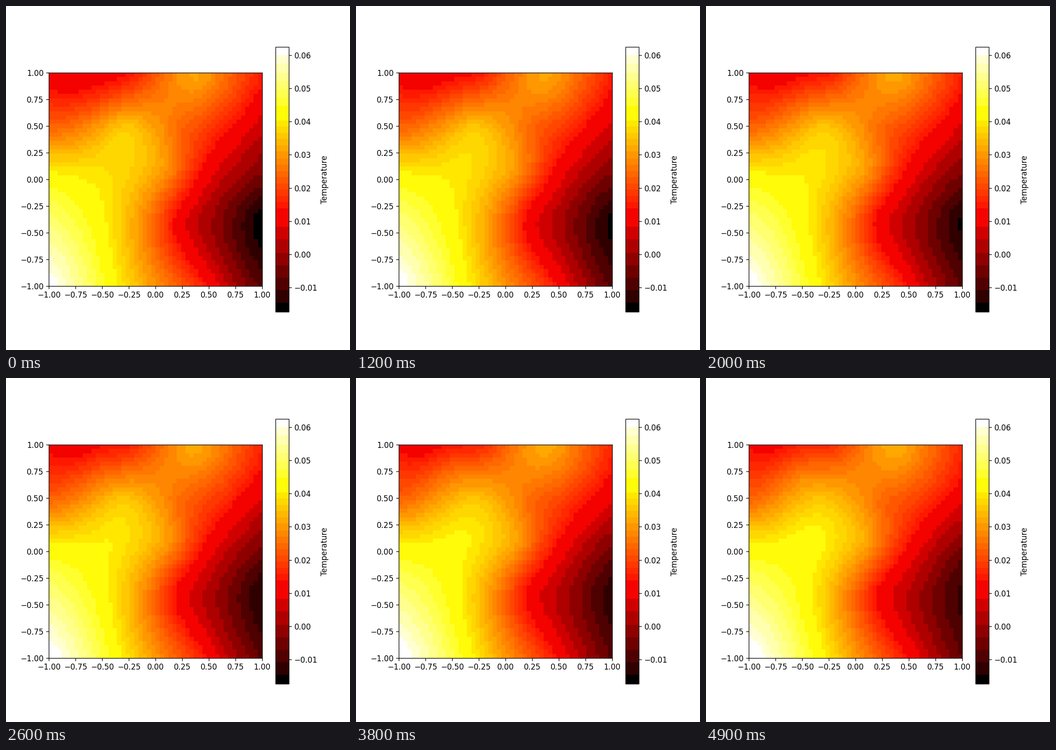
A matplotlib script for the animation above (5 s loop, 748x748 px).

```python
import numpy as np
import matplotlib.pyplot as plt
from matplotlib.animation import FuncAnimation
from matplotlib.colors import ListedColormap

SIZE, DPI = 748, 120
LAYOUT = 747.6          # side in pixels that the axes are laid out on
FRAMES, INTERVAL = 50, 100
CELLS = 50
VMIN, VMAX = -0.01724, 0.06243

# Sensors: x, y, starting heat and its rise over a loop, in percent of the range.
SENSORS = np.array([
    (-0.80, 1.00, 32.5, 4.0), (-0.25, 1.00, 39.0, 3.5),
    (0.37, 1.00, 61.0, 1.5), (1.00, 1.00, 40.3, 1.7),
    (-0.50, 0.75, 46.0, 8.0), (-1.00, 0.50, 51.0, 0.0),
    (-0.30, 0.47, 67.0, -0.5), (0.25, 0.45, 51.0, 1.0),
    (1.00, 0.50, 29.0, 5.0), (-0.40, 0.15, 69.5, 4.5),
    (0.10, 0.10, 58.5, 3.0), (0.55, 0.10, 33.5, 4.0),
    (-1.00, 0.00, 75.5, 0.0), (1.00, 0.00, 15.0, 0.0),
    (-0.50, -0.40, 73.5, 2.3), (0.00, -0.40, 51.0, 0.5),
    (0.25, -0.40, 34.0, 2.0), (1.00, -0.39, 0.0, 6.5),
    (-1.00, -1.00, 100.0, 2.0), (-0.40, -1.00, 74.5, 3.5),
    (0.40, -1.00, 43.0, 0.0), (1.00, -1.00, 11.0, 2.0),
])


def banded_hot():
    """Hot colormap with each channel merged into a few coarse steps."""
    colors = plt.get_cmap("hot")(np.arange(256), bytes=True)[:, :3].astype(int)
    keys = colors // [32, 16, 32]
    banded = np.empty((256, 3))
    for key in np.unique(keys, axis=0):
        same = (keys == key).all(axis=1)
        banded[same] = colors[same].mean(axis=0)
    banded[(keys == keys[0]).all(axis=1)] = 0
    banded[(keys == keys[-1]).all(axis=1)] = 255
    return ListedColormap(banded / 255)


def spread(points, values, targets):
    """Interpolate scattered values with soft cones on top of a plane."""
    def cones(a):
        gap = a[:, None] - points[None]
        return np.sqrt((gap**2).sum(axis=2) + 0.01)

    def plane(a):
        return np.column_stack([np.ones(len(a)), a])

    n = len(points)
    system = np.zeros((n + 3, n + 3))
    system[:n, :n] = cones(points)
    system[:n, n:] = plane(points)
    system[n:, :n] = plane(points).T
    known = np.vstack([values, np.zeros((3, values.shape[1]))])
    weights = np.linalg.solve(system, known)
    return np.hstack([cones(targets), plane(targets)]) @ weights


centres = (np.arange(CELLS) + 0.5) * 2 / CELLS - 1
X, Y = np.meshgrid(centres, -centres)
cells = np.column_stack([X.ravel(), Y.ravel()])
start, rise = spread(SENSORS[:, :2], SENSORS[:, 2:], cells).T.reshape(2, CELLS, CELLS)


def temperature(frame):
    percent = start + rise * frame / (FRAMES - 1)
    return VMIN + percent / 100 * (VMAX - VMIN)


plt.rcParams["font.family"] = "DejaVu Sans"
fig, ax = plt.subplots(figsize=(SIZE / DPI, SIZE / DPI), dpi=DPI)
fig.subplots_adjust(left=0.125 * LAYOUT / SIZE, right=0.9 * LAYOUT / SIZE,
                    bottom=(0.11 * LAYOUT + 1) / SIZE,
                    top=(0.88 * LAYOUT + 1) / SIZE)
image = ax.imshow(temperature(0), cmap=banded_hot(), vmin=VMIN, vmax=VMAX,
                  extent=(-1, 1, -1, 1), interpolation="nearest")
ticks = np.linspace(-1, 1, 9)
ax.set_xticks(ticks)
ax.set_yticks(ticks)
fig.colorbar(image, ax=ax, label="Temperature")


def update(frame):
    image.set_data(temperature(frame))
    return [image]


anim = FuncAnimation(fig, update, frames=FRAMES, interval=INTERVAL,
                     repeat=True, repeat_delay=0)
plt.show()
```
